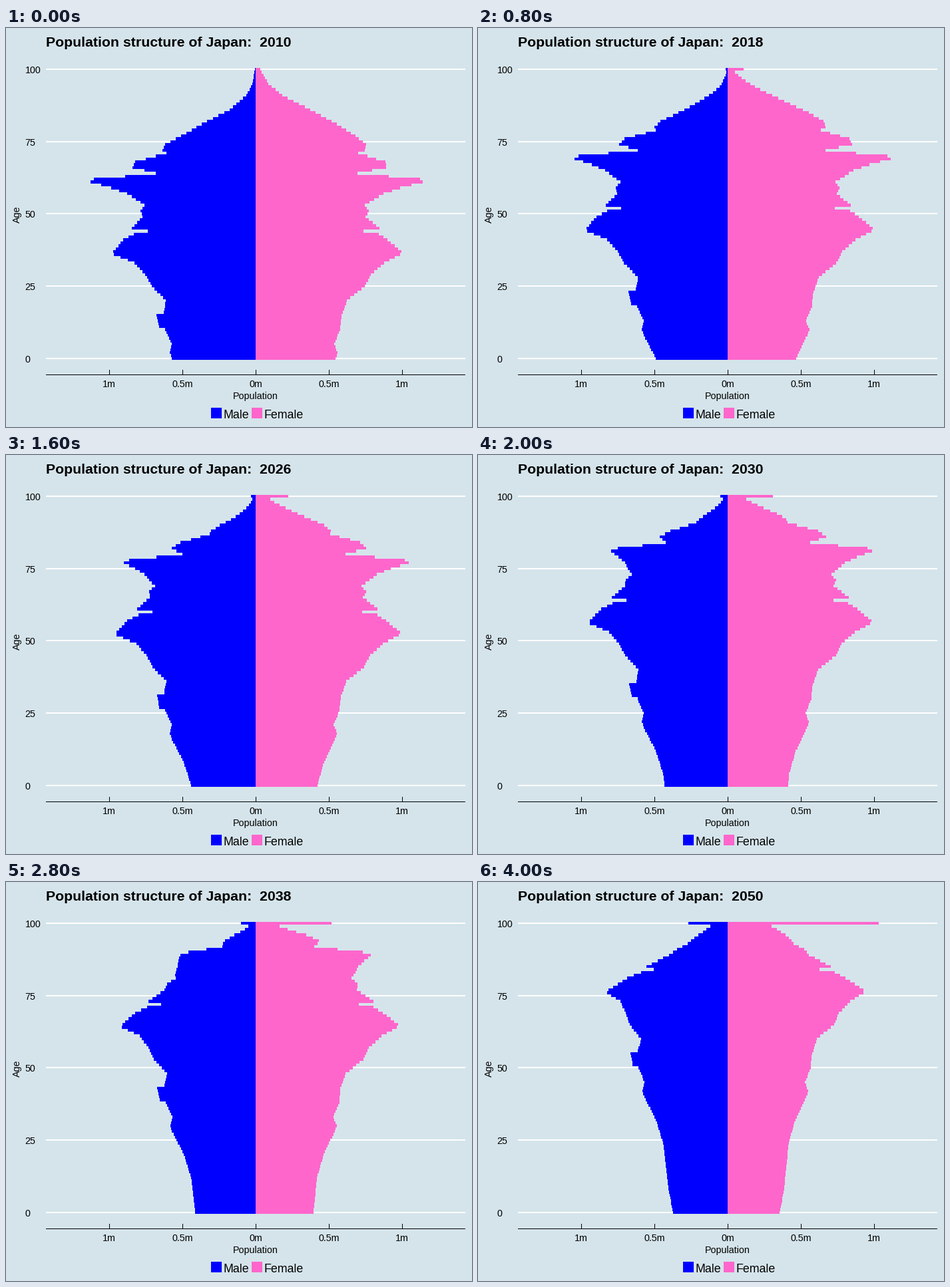
Recreate the animation shown at these times as a matplotlib script. Size 700 by 600 pixels, loop 4400 ms.

```python
import math
import numpy as np
import matplotlib.pyplot as plt
from matplotlib.animation import FuncAnimation
from matplotlib.patches import Rectangle

plt.rcParams["font.family"] = "Liberation Sans"

W, H, DPI = 700, 600, 100
FIRST, LAST, HOLD = 2010, 2050, 3
MID = 375                 # x of the zero line
MILLION = 220             # pixels per million people
AGE0_Y, AGE_STEP = 497, 4.35
AGES = np.arange(101)
PAPER, BLUE, PINK = "#D5E4EB", "#0000FF", "#FF66CC"

# Turning points of the first pyramid: age, men, women (bar lengths in pixels)
TURNS = np.array([
    (0, 126, 119), (2, 129, 122), (5, 126, 117), (10, 136, 126),
    (11, 145, 126), (15, 149, 128), (16, 138, 130), (20, 135, 136),
    (25, 156, 163), (29, 166, 172), (33, 182, 192), (36, 213, 216),
    (37, 214, 218), (41, 199, 197), (43, 183, 184), (44, 162, 161),
    (45, 186, 185), (49, 170, 164), (51, 173, 169), (53, 167, 163),
    (57, 193, 191), (59, 217, 216), (61, 248, 250), (62, 243, 246),
    (64, 150, 152), (66, 185, 195), (68, 181, 194), (71, 134, 153),
    (72, 140, 163), (74, 136, 165), (77, 112, 149), (81, 81, 121),
    (86, 39, 81), (91, 14, 39), (95, 5, 18), (100, 1, 6)]).T


def births(year):
    return np.interp(year, [2010, 2018, 2026, 2042, 2050],
                     [126, 108, 97, 89, 82])


def survival(year, level, slope, curve, trend, floor):
    """Chance of living one more year; mortality falls, less so near 100."""
    mid_age = AGES + 0.5
    d = mid_age - 75
    gain = trend * (year + 0.5 - 2014) * np.clip((105 - mid_age) / 10, 0, 1)
    g = np.exp(level + slope * d + curve * d ** 2 + gain)
    return np.exp(-g / (1 + 0.5 * g) - floor)


def project(lengths, birth_share, *mortality):
    """Age every cohort year by year; the last group stays open."""
    people = [np.interp(AGES, TURNS[0], lengths)]
    for year in range(FIRST, LAST):
        alive = people[-1] * survival(year, *mortality)
        new = np.append(birth_share * births(year + 1), alive[:-1])
        new[-1] += alive[-1]
        people.append(new)
    return people


men = project(TURNS[1], 1, -3.62, 0.110, 0.0004, -0.021, 0)
women = project(TURNS[2], 0.944, -4.5, 0.138, 0, -0.023, 0.0004)

fig = plt.figure(figsize=(W / DPI, H / DPI), dpi=DPI, facecolor=PAPER)
ax = fig.add_axes([0, 0, 1, 1])
ax.axis("off")


def box(x, y, w, h, color):
    ax.add_patch(Rectangle((x, y), w, h, fc=color, lw=0, antialiased=False))


def label(x, y, text, px, **kw):
    return ax.text(x, y, text, fontsize=px * 72 / DPI, color="black",
                   va="baseline", **kw)


def side(color):
    edges = AGE0_Y - AGE_STEP * (np.arange(102) - 0.5)
    return ax.stairs(np.full(101, MID), edges, orientation="horizontal",
                     baseline=MID, fill=True, color=color, lw=0,
                     antialiased=False, zorder=2)


for age in range(0, 101, 25):
    y = AGE0_Y - AGE_STEP * age
    box(60, math.ceil(y - 1.5), 630, 2, "white")
    label(28.5, y + 5.8, str(age), 14.2)

box(60, 521, 630, 1, "black")
for value in (-1, -0.5, 0, 0.5, 1):
    x = MID + value * MILLION
    box(x, 514, 1, 7, "black")
    label(x, 540, f"{abs(value):g}m", 14.2, ha="center")

label(374.5, 558, "Population", 14.2, ha="center")
label(21, 280, "Age", 14.2, ha="center", rotation=90, rotation_mode="anchor")

for x, name, color in ((308, "Male", BLUE), (369, "Female", PINK)):
    box(x, 571, 16, 16, color)
    label(x + 18.5, 587, name, 17.7)

title = label(60, 28, "", 21.3, weight="bold")
left, right = side(BLUE), side(PINK)
ax.set_xlim(0, W)
ax.set_ylim(H, 0)


def draw(i):
    n = min(i, LAST - FIRST)
    title.set_text(f"Population structure of Japan:  {FIRST + n}")
    left.set_data(values=MID - men[n])
    right.set_data(values=MID + 1 + women[n])
    return title, left, right


anim = FuncAnimation(fig, draw, frames=LAST - FIRST + 1 + HOLD, interval=100,
                     repeat=True, repeat_delay=0)
plt.show()
```
